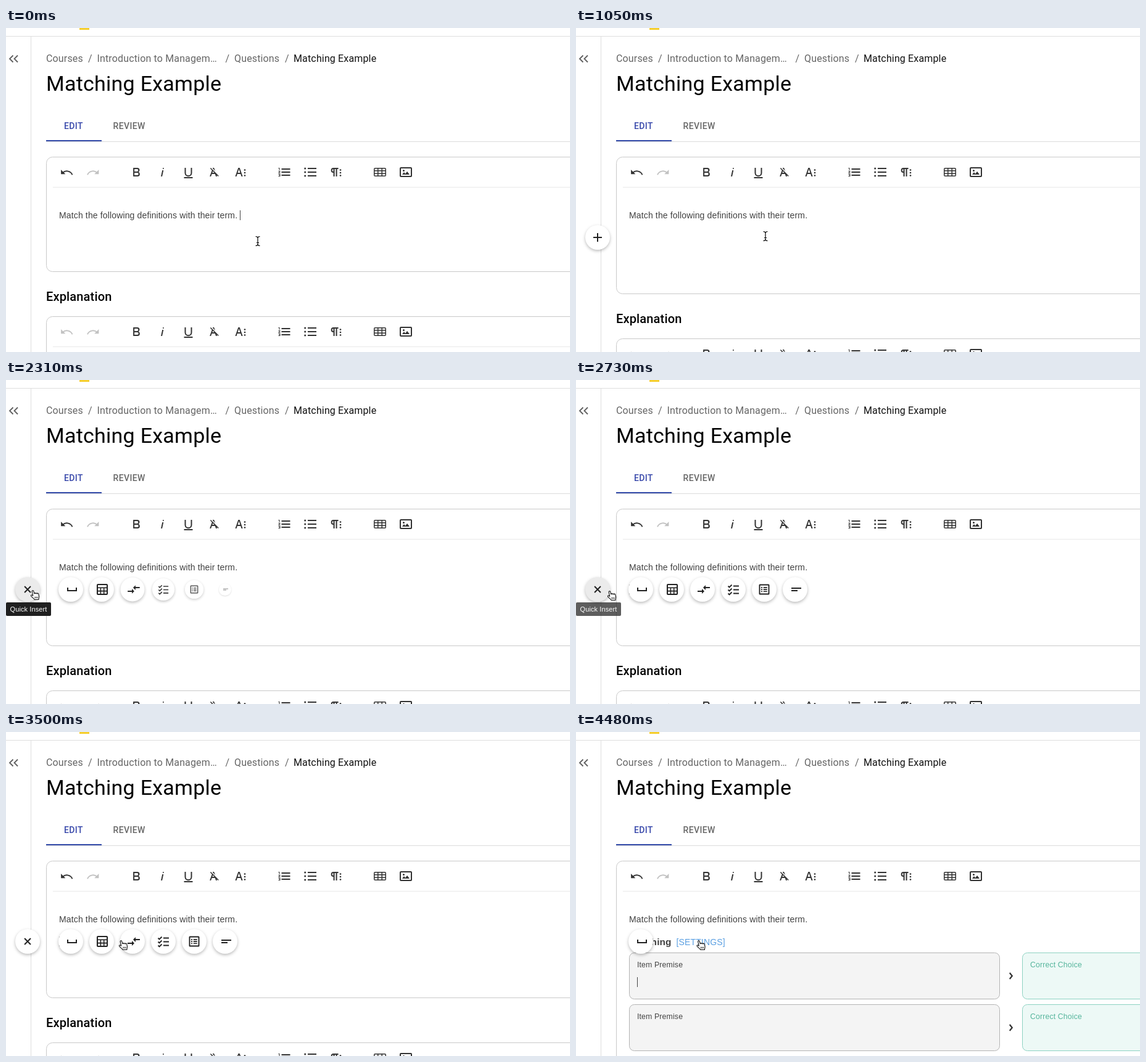
An HTML page that plays this animation: 914 by 526 pixels, repeating every 4550 ms.

```html
<!DOCTYPE html>
<html lang="en">
<head>
<meta charset="utf-8">
<title>Matching Example</title>
<style>
html, body { margin: 0; width: 100%; height: 100%; overflow: hidden; background: #fff; }
svg { display: block; width: 914px; height: 526px; }
text { font-family: Roboto, sans-serif; white-space: pre; }
.crumb { font-size: 16px; letter-spacing: .15px; fill: #666; }
.title { font-size: 34px; letter-spacing: .25px; }
.tab { font-size: 14px; font-weight: 500; letter-spacing: .4px; fill: #666; }
.head { font-size: 20px; font-weight: 500; letter-spacing: .15px; }
.body, .label, .tip { font-family: "Liberation Sans", Arial, sans-serif; }
.body { font-size: 14px; letter-spacing: .14px; fill: #414141; }
.label { font-size: 12.3px; letter-spacing: .14px; fill: #444; }
.tip { font-size: 11px; letter-spacing: .11px; fill: #fff; }
.round { filter: drop-shadow(0 2px 2.5px rgba(0,0,0,.27)); }
.round.pressed { filter: drop-shadow(0 5px 9px rgba(0,0,0,.42)); }
</style>
</head>
<body>
<svg id="stage" viewBox="0 0 914 526"></svg>
<script>
const LOOP = 4550, STEP = 70;
const stage = document.getElementById('stage');
const $ = id => document.getElementById(id);

const text = (cls, x, y, s, extra = '') => `<text class="${cls}" x="${x}" y="${y}" ${extra}>${s}</text>`;
const line = (d, color, w = 1) => `<path d="${d}" fill="none" stroke="${color}" stroke-width="${w}"/>`;
const box = (x, y, w, h, r, stroke, fill = 'none', id = '') =>
  `<rect ${id && `id="${id}"`} x="${x}" y="${y}" width="${w}" height="${h}" rx="${r}" stroke="${stroke}" fill="${fill}"/>`;
const icon = (art, x, y, color = '#333', flip = 1) =>
  `<g transform="translate(${x} ${y}) scale(${flip} 1) translate(-12 -12)" fill="${color}" stroke="none" color="${color}" fill-rule="evenodd">${art}</g>`;
const p = d => `<path d="${d}"/>`;
const dots = (x, ys, r) => ys.map(y => `<circle cx="${x}" cy="${y}" r="${r}"/>`).join('');

const more = dots(19, [8.5, 13, 17.5], 1.35);
const undo = p('M2.6 8v7.2h7.2z') + line('M5.5 12.9A9.6 9.6 0 0 1 21 16.4', 'currentColor', 1.8);
const tools = [
  [211.5, p('M15.25 11.8A3.68 3.68 0 0 0 17 9a3.93 3.93 0 0 0-3.86-4H6.65V19h7a3.74 3.74 0 0 0 3.7-3.78v-.12a3.64 3.64 0 0 0-2.1-3.3zM8.65 7h4.2a2 2 0 0 1 0 4h-4.2zm4.6 10h-4.6v-4h4.6a2 2 0 0 1 0 4z')],
  [253.5, p('M11.76 9h2l-2.2 10h-2zm1.68-4a1 1 0 1 0 1 1 1 1 0 0 0-1-1z')],
  [295.5, p('M19 20v2H5v-2z') + line('M7 5v8.2a5 5 0 0 0 10 0V5', 'currentColor', 2)],
  [337.5, p('M11.48 10.09 6.43 5 5.37 6.1 8.25 9 4.66 19h2l1.43-4h5.14l1.43 4h2l-.89-2.48L18.27 19l1.07-1.06-4.74-4.74zM8.8 13l.92-2.56L12.27 13zm.56-7.15.3-.85h2l1.75 4.9z')],
  [380, p('M13.55 19h2.07L10.71 5H8.38L3.47 19h2.07l1.33-4h5.35zM7.53 13l2.02-6 2 6z') + more],
  [451, p('M2.5 16h2v.5h-1v1h1v.5h-2v1h3v-4h-3zm1-7h1V5h-2v1h1zm-1 2h1.8l-1.8 2.1v.9h3v-1H3.7l1.8-2.1V10h-3zM7.5 6v2h14V6zm0 12h14v-2h-14zm0-5h14v-2h-14z')],
  [493, dots(3.7, [6, 12, 18], 1.5) + p('M8 5h14v2H8zM8 11h14v2H8zM8 17h14v2H8z')],
  [535, p('M7.7 5a4 4 0 0 0-.13 8v6h2V7h2v12h2V7h2V5zM5.5 9a2 2 0 0 1 2-2v4a2 2 0 0 1-2-2z') + more],
  [606, `<rect x="2.75" y="5.75" width="18.5" height="12.5" rx="1.3" fill="none" stroke="currentColor" stroke-width="1.5"/>` +
    line('M2.5 9.75h19M2.5 14.25h19M8.75 6v12M15.25 6v12', 'currentColor', 1.5)],
  [648, p('M14.2 11l3.8 5H6l3-3.9 2.1 2.7L14 11zM8.5 11a1.5 1.5 0 1 0 0-3 1.5 1.5 0 0 0 0 3zM22 6v12a2 2 0 0 1-2 2H4a2 2 0 0 1-2-2V6a2 2 0 0 1 2-2h16a2 2 0 0 1 2 2zm-2 0H4v12h16z')]
];
const toolbar = (y, undoColor) =>
  icon(undo, 98.5, y, undoColor) + icon(undo, 141, y, '#c2c2c2', -1) +
  tools.map(([x, art]) => icon(art, x, y)).join('') +
  line(`M76 ${y + 24.5}H914`, '#e9e9e9');

// Quick insert actions: artwork and its offset from the button centre
const check = y => `M3.5 ${y}l2 2 4-4M12 ${y}h9`;
const actions = [
  [2, p('M18 9v4H6V9H4v6h16V9z')],
  [1, `<rect x="4" y="4" width="16" height="16" rx="1" fill="none" stroke="currentColor" stroke-width="2"/>` +
    line('M4 9.3h16M4 14.6h16M9.4 9v11M14.7 9v11', 'currentColor', 1.6)],
  [2, p('M9 14H2v2h7v3l4-4-4-4zM15 13v-3h7V8h-7V5l-4 4z')],
  [0, line(check(6.5) + check(12.5) + check(18.5), 'currentColor', 1.8)],
  [0, `<rect x="4.5" y="4.5" width="15" height="15" rx=".6" fill="none" stroke="currentColor" stroke-width="1.9"/>` +
    [8, 11.2, 14.4].map(y => p(`M7 ${y}h2v1.7H7zM10.7 ${y}h6v1.7h-6z`)).join('')],
  [2, p('M4 9h16v2H4zm0 4h10v2H4z')]
];

const row = y =>
  box(86.5, y, 600, 75, 8, '#b4b4b4', '#f4f4f4') + text('label', 99, y + 23.5, 'Item Premise') +
  line(`M702.8 ${y + 32.5}l4 5-4 5`, '#333', 2.2) +
  box(723.5, y, 240, 75, 8, '#8dd2c2', '#edf9f6') + text('label', 736, y + 23.5, 'Correct Choice', 'style="fill:#55b59c"');

const tip = (id, x, w, label) => `<g id="${id}"><rect x="${x}" y="361" width="${w}" height="22" rx="2" fill="#1f1f1f"/>
  ${text('tip', x + w / 2, 376, label, 'text-anchor="middle"')}</g>`;

stage.innerHTML = `
<rect width="914" height="526" fill="#fff"/>
<rect x="119" width="16" height="3" fill="#f6cf2f"/>
${line('M0 13.5H914M40.5 14V526', '#dedede')}
${line('M11.5 44.5 6 50l5.500 5.500M19 44.500 13.500 50l5.500 5.500', '#616161', 1.9)}
${text('crumb', 65, 55, 'Courses')}${text('crumb', 133, 55, '/')}
${text('crumb', 147.5, 55, 'Introduction to Managem…')}${text('crumb', 355.500, 55, '/')}
${text('crumb', 370, 55, 'Questions')}${text('crumb', 452, 55, '/')}
${text('crumb', 466, 55, 'Matching Example', 'style="fill:#111"')}
${text('title', 65, 102, 'Matching Example')}
${text('tab', 94, 164, 'EDIT', 'style="fill:#3949ab"')}${text('tab', 173.500, 164, 'REVIEW')}
${line('M65 184.5H914', '#dcdcdc')}<rect x="65" y="182" width="90" height="2" fill="#3149a8"/>
${box(65.5, 209.5, 900, 186, 10, '#c9c9c9', '#fff', 'editor')}
${toolbar(234, '#333')}
${text('body', 86, 309, 'Match the following definitions with their term.')}
<g id="lower">${text('head', 65, 443, 'Explanation')}
${box(65.5, 468.5, 900, 186, 10, '#c9c9c9')}${toolbar(493, '#c2c2c2')}</g>
<g id="match">
${text('body', 86, 346, 'Matching', 'style="font-size:15.4px;font-weight:700"')}
${text('body', 162.5, 346, '[SETTINGS]', 'style="fill:#5a9fe2"')}
${row(358.5)}${row(442.5)}</g>
<rect id="caret" width="1" height="16" fill="#444"/>
${actions.map(([dx, art], i) => `<g id="act${i}"><circle class="round" r="20" fill="#fff"/>${icon(art, dx, 0, '#222')}</g>`).join('')}
<g id="fab"><circle id="disc" class="round" r="20"/>
<g id="plus">${line('M-7 0H7M0-7V7', '#222', 2)}</g></g>
${tip('tipInsert', 0, 73, 'Quick Insert')}${tip('tipMatch', 174, 62, 'Matching')}
<g id="beam">${['#fff', '#000'].map((c, i) => `<path d="M-3.500-7.500Q-.500-7.500 0-5.500 .500-7.500 3.500-7.500M-3.500 7.500Q-.500 7.500 0 5.500 .500 7.500 3.500 7.500M0-6V6M-2 2.500H2" fill="none" stroke="${c}" stroke-width="${i ? 1.2 : 3}"/>`).join('')}</g>
<g id="hand"><path d="M-3.3 1.200-4.800-5.600a1.300 1.300 0 0 1 2.500-.7L-1.200-2.200a1.200 1.200 0 0 1 2.300-.1 1.200 1.200 0 0 1 2.300.4 1.150 1.150 0 0 1 2.300.500L6.500 2c.3 2-.6 3-.6 5.500H-.8C-1.600 5.500-4 4.500-6.300 1.800c-.9-1.400.6-2.300 1.600-1.500z" fill="#fff" stroke="#111" stroke-width="1.100" stroke-linejoin="round"/>
${line('M0 2.800V5.500M2 2.800V5.500M4 2.800V5.500', '#111', .9)}</g>`;

const clamp = v => Math.max(0, Math.min(1, v));
const ramp = (t, a, b) => clamp((t - a) / (b - a));
const ease = v => 1 - (1 - v) ** 3;
const show = (id, on) => $(id).setAttribute('visibility', on ? 'visible' : 'hidden');
const move = (id, x, y, rest = '') => $(id).setAttribute('transform', `translate(${x} ${y}) ${rest}`);
const within = (t, a, b) => t >= a && t < b;

// Pointer path: time, x, y
const path = [
  [700, 408, 346], [840, 396, 345], [1050, 307, 338], [1260, 153, 337], [1400, 84, 342],
  [1540, 53, 348], [1680, 47, 349], [2590, 47, 349], [2730, 58, 350], [2940, 98, 349],
  [3150, 146, 347], [3290, 168, 346], [3500, 190, 346], [3640, 201, 346], [3780, 202.500, 346]
];
function pointer(t) {
  let i = path.findIndex(k => k[0] > t);
  if (i === 0) return path[0].slice(1);
  if (i < 0) return path.at(-1).slice(1);
  const a = path[i - 1], b = path[i], f = ramp(t, a[0], b[0]);
  return [1, 2].map(j => a[j] + (b[j] - a[j]) * f);
}

function draw(t) {
  const grown = t >= 140, inserted = t >= 4410;
  $('editor').setAttribute('height', inserted ? 500 : grown ? 222 : 186);
  move('lower', 0, grown ? 36 : 0);
  show('lower', !inserted);
  show('match', inserted);

  const [cx, cy] = inserted ? [99, 398] : grown ? [86, 332] : [379, 296];
  move('caret', cx, cy);
  show('caret', inserted || t < 245 || Math.floor((t - 245) / 525) % 2 === 0);

  actions.forEach((_, i) => {
    const open = ease(ramp(t, 2060 + i * 40, 2300 + i * 40));
    const close = ramp(t, 4480 - i * 30, 4580 - i * 30);
    const s = t >= 4480 && i ? 0 : open * (1 - close);
    move('act' + i, 105 + 50 * i, 340, `scale(${s})`);
    $('act' + i).setAttribute('opacity', s);
    show('act' + i, s > 0);
  });
  $('act2').firstChild.classList.toggle('pressed', within(t, 4200, 4340));

  show('fab', within(t, 140, 4480));
  move('fab', 35, 340, `scale(${t < 210 ? .6 : 1})`);
  $('disc').setAttribute('fill', within(t, 1540, 2800) ? '#ebebeb' : '#fff');
  $('disc').classList.toggle('pressed', within(t, 1960, 2100));
  move('plus', 0, 0, `rotate(${45 * ease(ramp(t, 2060, 2310))})`);

  $('tipInsert').setAttribute('opacity', ramp(t, 1540, 1680) * (1 - ramp(t, 2660, 2910)));
  $('tipMatch').setAttribute('opacity', ramp(t, 3500, 3680) * (t < 4200 ? 1 : 0));

  const [x, y] = pointer(t), hand = t >= 1470;
  move('beam', x, y);
  move('hand', x, y);
  show('beam', !hand);
  show('hand', hand);
}

const start = performance.now();
function tick() {
  const t = (performance.now() - start) % LOOP;
  draw(Math.floor(t / STEP) * STEP);
  requestAnimationFrame(tick);
}
tick();
</script>
</body>
</html>
```
